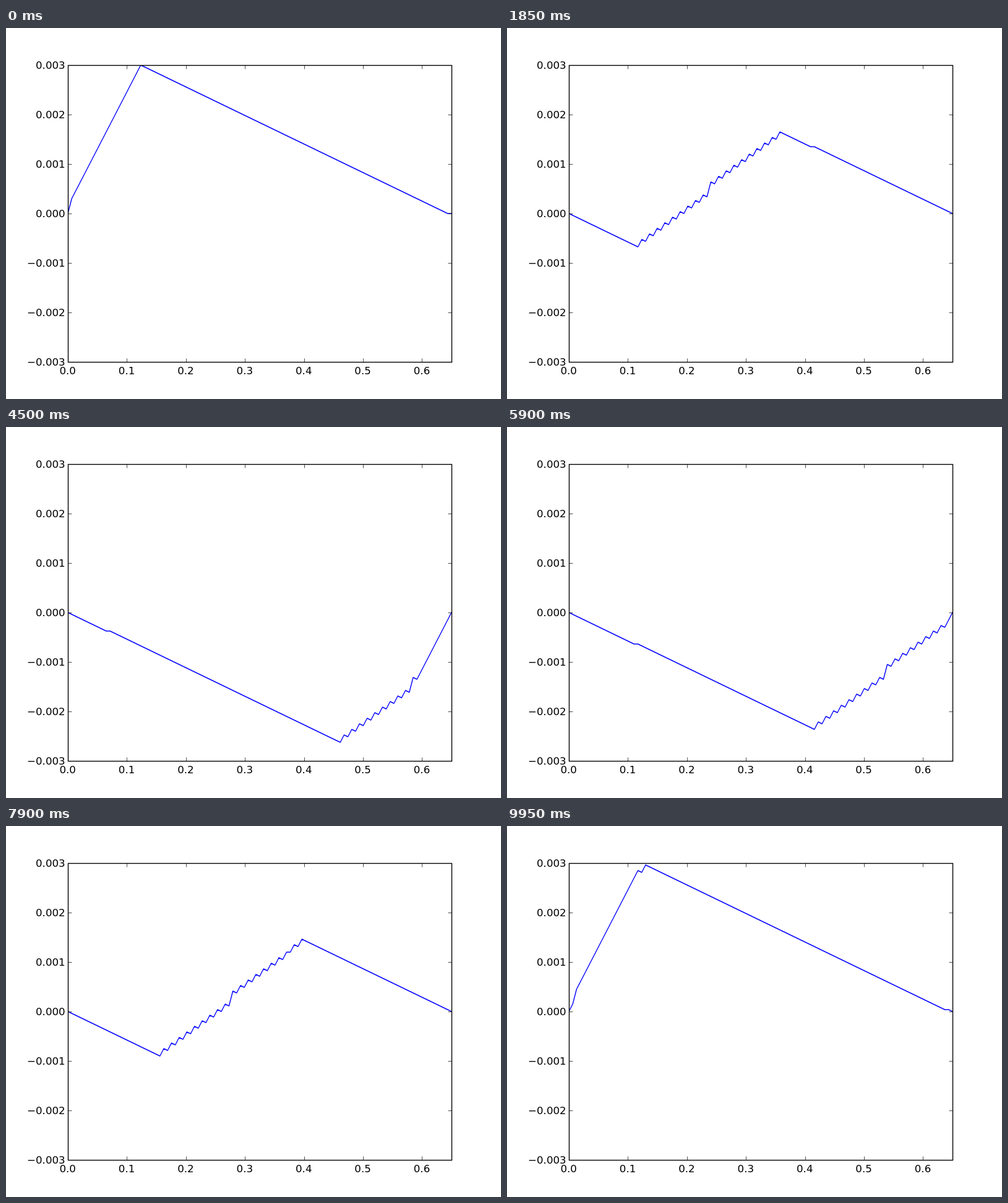
Write an HTML page that moves like this. It is 800 px wide and 600 px high and loops after 10 s.

```html
<!DOCTYPE html>
<html lang="en">
<head>
<meta charset="utf-8">
<title>Plucked string</title>
<style>
  html, body { margin: 0; width: 100%; height: 100%; overflow: hidden; background: #fff; }
  svg { display: block; width: 800px; height: 600px; }
  text { font: 16.667px "DejaVu Sans", sans-serif; fill: #000; }
</style>
</head>
<body>
<svg viewBox="0 0 800 600">
  <clipPath id="plot"><rect x="100" y="60" width="620" height="480"/></clipPath>
  <g clip-path="url(#plot)">
    <polyline id="string" fill="none" stroke="#00f" stroke-width="1.389"
      stroke-linejoin="round" stroke-linecap="square"/>
  </g>
  <path id="ticks" fill="none" stroke="#000" stroke-width="0.694"/>
  <rect x="100.5" y="60.5" width="620" height="480" fill="none" stroke="#000" stroke-width="1.389"/>
  <g id="labels"></g>
</svg>
<script>
const LEFT = 100, RIGHT = 720, TOP = 60, BOTTOM = 540;
const NODES = 100, STEPS = 200, STEP_MS = 50;
const PEAK = 0.003, LENGTH = 0.65;
const byId = id => document.getElementById(id);

function addLabel(x, y, anchor, value) {
  const el = document.createElementNS("http://www.w3.org/2000/svg", "text");
  el.setAttribute("x", x);
  el.setAttribute("y", y);
  el.setAttribute("text-anchor", anchor);
  el.textContent = value.replace("-", "\u2212");
  byId("labels").append(el);
}

function drawAxes() {
  let d = "";
  for (let i = 0; i <= 6; i++) {
    const x = LEFT + (RIGHT - LEFT) * i / 10 / LENGTH;
    const px = Math.round(x) + 0.5;
    d += `M${px} ${BOTTOM + 0.5}v-6M${px} ${TOP + 0.5}v6`;
    addLabel(x - 0.3, 560, "middle", (i / 10).toFixed(1));

    const y = TOP + 80 * i;
    d += `M${LEFT + 0.5} ${y + 0.5}h6M${RIGHT + 0.5} ${y + 0.5}h-6`;
    addLabel(95.7, y + 6, "end", ((3 - i) / 1000).toFixed(3));
  }
  byId("ticks").setAttribute("d", d);
}

// Leapfrog wave equation at unit Courant number, both ends fixed.
function simulate() {
  const pluck = Array.from({ length: NODES + 1 }, (_, i) =>
    i === 0 || i === NODES ? 0 : PEAK * Math.min((i + 1) / 20, (99 - i) / 80));
  const states = [pluck, pluck];
  while (states.length < STEPS) {
    const [prev, now] = states.slice(-2);
    states.push(now.map((_, i) =>
      i === 0 || i === NODES ? 0 : now[i - 1] + now[i + 1] - prev[i]));
  }
  return states;
}

const toPoints = state => state.map((y, i) =>
  `${(LEFT + (RIGHT - LEFT) * i / NODES).toFixed(2)},${(300 - y * 80000).toFixed(2)}`).join(" ");

drawAxes();
const shapes = simulate().map(toPoints);
const line = byId("string");
const start = performance.now();
let shown = -1;

function render() {
  const step = Math.floor((performance.now() - start) / STEP_MS) % STEPS;
  if (step !== shown) {
    line.setAttribute("points", shapes[step]);
    shown = step;
  }
  requestAnimationFrame(render);
}
render();
</script>
</body>
</html>
```
